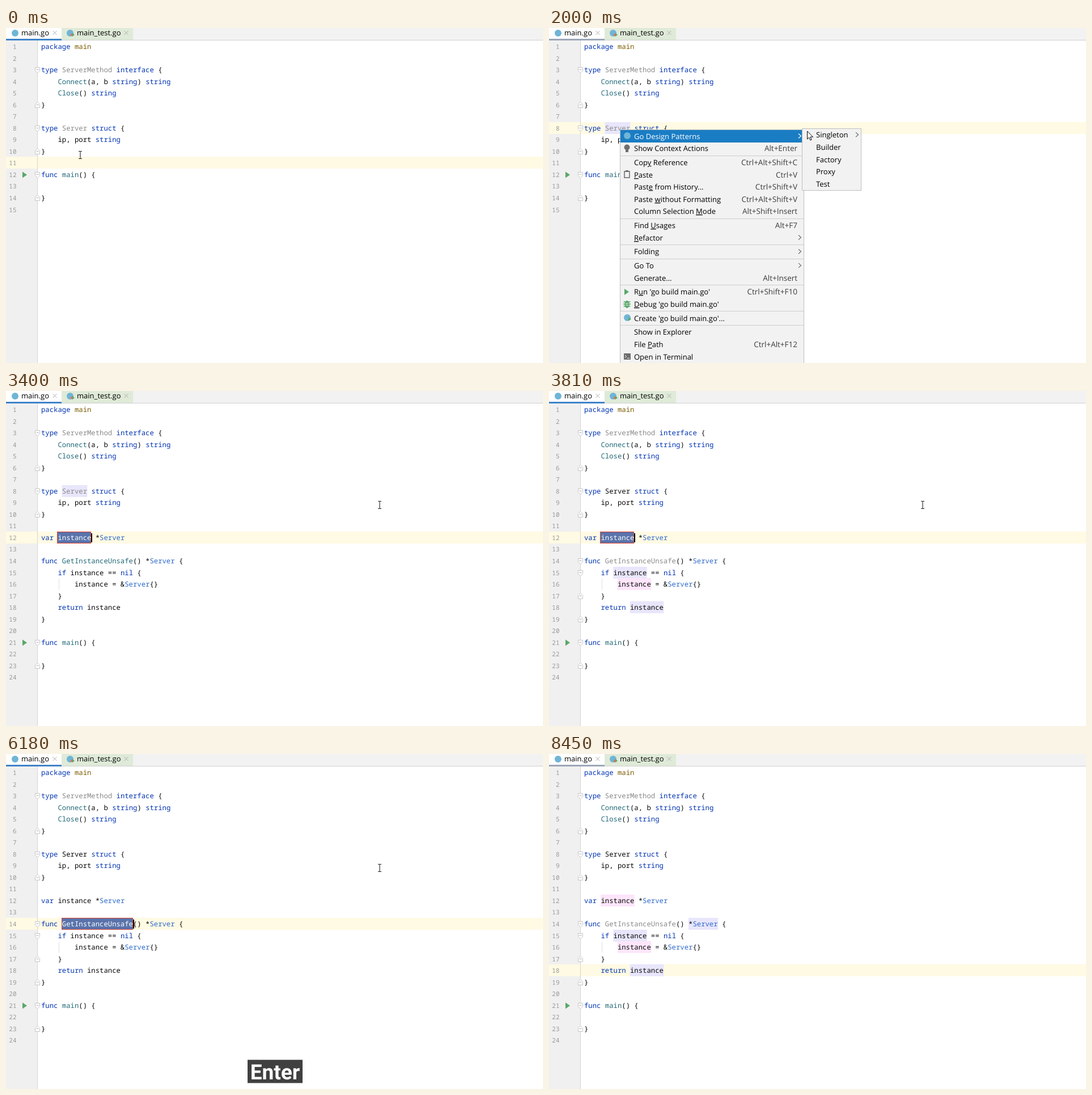
Recreate the animation shown at these times as an HTML page. Size 947 by 591 pixels, loop 8.52 s.

```html
<!DOCTYPE html>
<html lang="en">
<head>
<meta charset="utf-8">
<title>Go editor</title>
<style>
  html, body { margin: 0; width: 100%; height: 100%; overflow: hidden; background: #fff; }
  svg { display: block; width: 947px; height: 591px; }
  text { white-space: pre; text-rendering: geometricPrecision; }
  .code { font: 12.28px "Noto Sans Mono", monospace; }
  .num { font: 11px "Noto Sans Mono", monospace; fill: #999; text-anchor: end; }
  .ui { font: 13px "Open Sans", "Noto Sans", sans-serif; }
  .keys { font-size: 13.5px; text-anchor: end; }
  .badge { font: bold 37px Roboto, sans-serif; text-anchor: middle; fill: #fff; }
  .u { text-decoration: underline; }
</style>
</head>
<body>
<svg id="stage" viewBox="0 0 947 591"></svg>
<script>
const LOOP = 8520, LEFT = 62, CHAR = 7.368;
const READ = '#e8e6fb', WRITE = '#fde5fa', ACCENT = '#1a7dc4', GREEN = '#59a869', GOPHER = '#6fb5d6';

const head = `package main

type ServerMethod interface {
    Connect(a, b string) string
    Close() string
}

type Server struct {
    ip, port string
}
`.split('\n');
const template = `var instance *Server

func GetInstanceUnsafe() *Server {
    if instance == nil {
        instance = &Server{}
    }
    return instance
}
`.split('\n');
const tail = ['func main() {', '', '}', ''];
const keywords = new Set('package type interface string struct func var if return nil'.split(' '));

const mainMenu = [
  ['Go Design Patterns', '>'], ['Show Context Actions', 'Alt+Enter'], '-',
  ['Cop_y Reference', 'Ctrl+Alt+Shift+C'], ['_Paste', 'Ctrl+V'],
  ['Past_e from History...', 'Ctrl+Shift+V'], ['Paste _without Formatting', 'Ctrl+Alt+Shift+V'],
  ['Column Selection _Mode', 'Alt+Shift+Insert'], '-',
  ['Find _Usages', 'Alt+F7'], ['_Refactor', '>'], '-',
  ['Folding', '>'], '-',
  ['Go To', '>'], ['Generate...', 'Alt+Insert'], '-',
  ['R_un \'go build main.go\'', 'Ctrl+Shift+F10'], ['_Debug \'go build main.go\''], '-',
  ['Create \'go build main.go\'...'], '-',
  ['Show in Explorer'], ['File _Path', 'Ctrl+Alt+F12'], ['Open in Terminal']
];
const patternMenu = [['Singleton', '>'], ['Builder'], ['Factory'], ['Proxy'], ['Test']];
const singletonMenu = [['Singleton(Safe)'], ['Singleton(UnSafe)']];

// Step tables: [start ms, value]
const activeRow = [[0, 11], [760, 8], [3320, 12], [5950, 14], [6730, 18]];
const caretAt = [
  [0, null], [380, [11, 0]], [760, [8, 9]], [1150, null],
  [3400, [12, 12]], [4470, null], [4930, [12, 12]], [5480, null],
  [5950, [14, 22]], [6730, [18, 19]], [7360, null], [7900, [18, 19]], [7970, null]
];
const selected = [[0, null], [3400, [12, 4, 8]], [5950, [14, 5, 17]], [6730, null]];
const uses = [[15, 7, 8, READ], [16, 8, 8, WRITE], [18, 11, 8, READ]];
const marks = [
  [0, []], [840, [[8, 5, 6, READ]]], [3700, []], [3810, uses],
  [6180, [[14, 5, 17, READ]]],
  [7040, [[12, 4, 8, WRITE], [14, 25, 7, READ], ...uses]]
];
const pointer = [[0, 'beam'], [1150, 'arrow'], [3170, 'beam'], [7970, 'none']];
// Pointer moves: [first step ms, last step ms, steps, x, y]
const moves = [
  [300, 610, 5, 126, 180], [1230, 2000, 11, 456, 182], [2080, 2390, 5, 540, 186],
  [2460, 2690, 4, 630, 186], [2770, 2850, 2, 657, 198], [3170, 3170, 1, 659, 201],
  [7590, 7670, 2, 812, 542], [7900, 7900, 1, 904, 567]
];

const at = (table, t) => table.filter(step => step[0] <= t).pop()[1];
const rowY = n => Math.round(33 + 20.54 * (n - 1));
const colX = c => LEFT + CHAR * c;
const esc = s => s.replace(/&/g, '&amp;').replace(/</g, '&lt;');
const rect = (x, y, w, h, fill, extra = '') =>
  `<rect x="${x}" y="${y}" width="${w}" height="${h}" fill="${fill}" ${extra}/>`;
const path = (d, fill, stroke = 'none', extra = '') =>
  `<path d="${d}" fill="${fill}" stroke="${stroke}" ${extra}/>`;
const dot = (x, y, r, fill) => `<circle cx="${x}" cy="${y}" r="${r}" fill="${fill}"/>`;
const text = (cls, x, y, body, fill) =>
  `<text class="${cls}" x="${x}" y="${y}"${fill ? ` fill="${fill}"` : ''}>${body}</text>`;
const play = (x, y) => path(`M${x} ${y - 5.5}l8 5.5l-8 5.5z`, GREEN);

function pointerPos(t) {
  let x = 131, y = 224;
  for (const [start, end, steps, toX, toY] of moves) {
    if (t < start) break;
    const done = end > start ? 1 + Math.floor((t - start) / (end - start) * (steps - 1) + 0.05) : 1;
    const p = Math.min(1, done / steps), ease = p * p * (3 - 2 * p);
    x += (toX - x) * ease;
    y += (toY - y) * ease;
  }
  return [x, y];
}

function hue(word, line, i, resolved) {
  if (keywords.has(word)) return '#0033b3';
  if (line.startsWith('package')) return '#7a5c00';
  if (/[*&]/.test(line[i - 1])) return '#2e69cb';
  if (word === 'ServerMethod' || (word === 'GetInstanceUnsafe' && resolved)) return '#8a8a8a';
  if (word === 'Server' && !resolved) return '#8a8a8a';
  return line[i + word.length] === '(' ? '#226878' : '#080808';
}

const codeLine = (line, n, resolved) => text('code', LEFT, rowY(n) + 4,
  line.replace(/\w+|&/g, (word, i) => word === '&' ? '&amp;' :
    `<tspan fill="${hue(word, line, i, resolved)}">${word}</tspan>`), '#080808');

function fold(y, opens) {
  const s = opens ? 1 : -1;
  return path(`M51.5 ${y - 4.5 * s}h8v${6 * s}l-4 ${4 * s}l-4 ${-4 * s}z`, '#fff', '#c6c6c6') +
    path(`M53.5 ${y - 0.5}h4`, 'none', '#b0b0b0');
}

function tabs(focused) {
  const close = x => path(`M${x - 3.5} 5l7 7m0 -7l-7 7`, 'none', '#adadad');
  return rect(0, 0, 947, 21, '#f2f2f2') + rect(0, 0, 98, 21, '#fff') + rect(98, 0, 126, 21, '#dfead8') +
    rect(0, 21, 947, 1, '#d1d1d1') + rect(0, 19, 98, 3, focused ? '#4083c9' : '#9ca7b8') +
    dot(16, 9, 6, GOPHER) + dot(113, 9, 6, GOPHER) +
    path('M117 9v6l-4 -3z', '#e0705a') + path('M117 9v6l4 -3z', GREEN) +
    text('ui', 27, 13, 'main.go', '#000') + text('ui', 125, 13, 'main_test.go', '#000') +
    close(86) + close(212);
}

function editor(t) {
  const inserted = t >= 3320, resolved = t >= 3700;
  const lines = [...head, ...(inserted ? template : []), ...tail];
  const row = rowY(at(activeRow, t)), chosen = at(selected, t), caret = at(caretAt, t);
  let out = rect(0, 22, 55, 569, '#f0f0f0') + rect(0, row - 11, 947, 21, '#fffae3') +
    rect(55, 22, 1, 569, '#d4d4d4');
  for (const [n, c, len, fill] of at(marks, t))
    out += rect(colX(c) - 0.3, rowY(n) - 11, len * CHAR + 0.6, 21, fill);
  if (inserted) out += rect(93, rowY(16) - 10, 1, 20, '#e0e0e0');
  lines.forEach((line, i) => {
    const n = i + 1, y = rowY(n);
    out += text('num', 18.5, y + 4, n) + codeLine(line, n, resolved);
    const pending = inserted && !resolved && n > 12 && n < 20;
    if (/[{}]$/.test(line) && !line.endsWith('{}') && !pending) out += fold(y, line.endsWith('{'));
    if (line.startsWith('func main')) out += play(29, y);
  });
  if (chosen) {
    const [n, c, len] = chosen, y = rowY(n);
    out += rect(Math.round(colX(c)) + 0.5 - 1, y - 10.5, Math.round(len * CHAR), 20, '#5973ab', 'stroke="#e0452f"') +
      text('code', colX(c), y + 4, lines[n - 1].slice(c, c + len), '#fff');
  }
  if (caret) out += rect(Math.floor(colX(caret[1])), rowY(caret[0]) - 8, 2, 16, '#000');
  return out;
}

function menu(x, y, w, h, items, firstY, labelX, picked) {
  let out = rect(x + 0.5, y + 0.5, w - 1, h, '#f2f2f2', 'stroke="#bfbfbf"'), cy = firstY;
  items.forEach((item, i) => {
    if (item === '-') {
      out += rect(x + 1, Math.round(cy - 9.5), w - 2, 1, '#cdcdcd');
      cy += 3.1;
      return;
    }
    const on = i === picked, ink = on ? '#fff' : '#000', base = Math.round(cy + 4.6);
    const [label, hint] = item;
    if (on) out += rect(x + 1, Math.round(cy - 11), w - 2, 22, ACCENT);
    out += text('ui', labelX, base, esc(label).replace(/_(.)/, '<tspan class="u">$1</tspan>'), ink);
    if (hint === '>')
      out += path(`M${x + w - 10} ${cy - 4.5}l4.5 4l-4.5 4`, 'none', on ? '#fff' : '#6e6e6e', 'stroke-width="1.2"');
    else if (hint) out += text('ui keys', 438, base, hint, '#3c3c3c');
    cy += 21.6;
  });
  return out;
}

function menuIcons() {
  const grey = '#6e6e6e';
  return dot(138, 190, 6, GOPHER) +
    dot(137.5, 210.5, 5, grey) + rect(135, 214, 5, 5, grey) +
    rect(133, 253, 9, 11, 'none', `stroke="${grey}" stroke-width="1.6"`) + rect(135, 251, 5, 3, grey) +
    play(133, 465.5) +
    path('M131.5 483h12M131 487h13M131.5 491h12', 'none', GREEN, 'stroke-width="1.6"') +
    `<ellipse cx="137.5" cy="487.5" rx="4.2" ry="6.5" fill="${GREEN}"/>` +
    path('M135 486h5M135 489h5', 'none', '#f2f2f2') +
    dot(138, 511, 6, GOPHER) + path('M140 510l5 3.5l-5 3.5z', GREEN) +
    rect(132, 574, 12, 11, grey) + path('M134 577l2.5 2.5l-2.5 2.5M138 582.5h4', 'none', '#fff');
}

function menus(t) {
  if (t < 1150 || t >= 3170) return '';
  const [x, y] = pointerPos(t);
  let out = menu(125, 179, 325, 420, mainMenu, 191, 150, t >= 1230 ? 0 : -1) + menuIcons();
  if (t >= 1540) out += menu(446, 177, 105, 109, patternMenu, 188.8, 471, t >= 2080 ? 0 : -1);
  if (t >= 2390) out += menu(546, 174, 153, 45, singletonMenu, 186, 571, x < 547 ? -1 : y < 196 ? 0 : 1);
  return out;
}

function mouse(t) {
  const kind = at(pointer, t), [x, y] = pointerPos(t).map(Math.round);
  if (kind === 'beam')
    return path(`M${x - 3} ${y - 6.5}h2.5l.5 .5l.5 -.5h2.5M${x} ${y - 6}v12M${x - 3} ${y + 6.5}h2.5l.5 -.5l.5 .5h2.5`,
      'none', '#222', 'stroke-width="1.1"');
  if (kind === 'arrow')
    return path(`M${x - 0.5} ${y}v14l3.2 -3l2.2 5l2.2 -1l-2.2 -4.8h4.6z`, '#fff', '#000');
  return '';
}

function badge(t) {
  if (t < 5330 || t >= 7360) return '';
  return rect(426, 539.5, 97, 41, '#404040') + text('badge', 474.5, 573.5, 'Enter');
}

const stage = document.getElementById('stage');
const start = performance.now();
let shown = '';
function draw() {
  const t = (performance.now() - start) % LOOP;
  const focused = t < 1150 || (t >= 3170 && t < 8450);
  const picture = editor(t) + tabs(focused) + menus(t) + badge(t) + mouse(t);
  if (picture !== shown) stage.innerHTML = shown = picture;
  requestAnimationFrame(draw);
}
draw();
</script>
</body>
</html>
```
